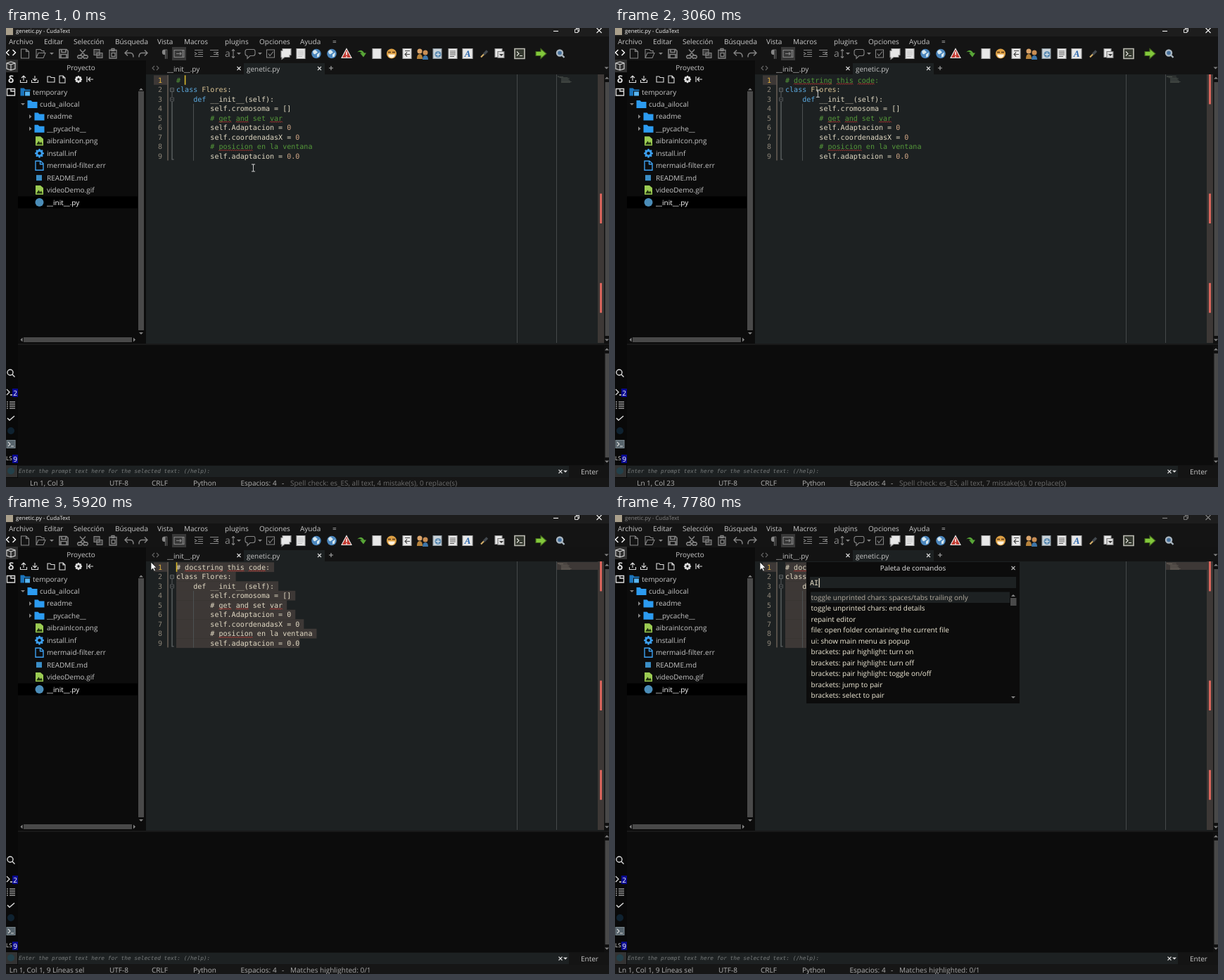
Write an HTML page with a canvas that moves like this. It is 857 by 653 pixels and loops after 8000 ms.

```html
<!DOCTYPE html>
<html lang="es">
<head>
<meta charset="utf-8">
<style>
html, body { margin: 0; width: 100%; height: 100%; overflow: hidden; background: #0b0b0b; }
canvas { display: block; }
</style>
</head>
<body>
<canvas id="stage" width="857" height="653"></canvas>
<script>
const ctx = document.getElementById('stage').getContext('2d');
const LOOP = 8000;
const UI = '"Open Sans", sans-serif', MONO = '"DejaVu Sans Mono", monospace';
const EDITOR = '#1d2122', BROWN = '#3d3836', GREY = '#858585', LIGHT = '#dcdcdc', BLUE = '#3da0f0';
const CELL = 6.045, LINE = 13.5, LEFT = 242, TOP = 67.3;

function rect(x, y, w, h, color) { ctx.fillStyle = color; ctx.fillRect(x, y, w, h); }
function frame(x, y, w, h, color) { ctx.strokeStyle = color; ctx.lineWidth = 1; ctx.strokeRect(x, y, w, h); }
function disc(x, y, r, color) { ctx.fillStyle = color; ctx.beginPath(); ctx.arc(x, y, r, 0, 7); ctx.fill(); }
// Text is placed by the vertical middle of its row.
function text(s, x, y, color = LIGHT, size = 10, align = 'left', family = UI, style = '') {
  ctx.font = `${style} ${size}px ${family}`;
  ctx.textAlign = align;
  ctx.fillStyle = color;
  ctx.fillText(s, x, y + size * 0.35);
}
function icon(x, y, path, stroke, fill, width = 1.1) {
  ctx.save();
  ctx.translate(x, y);
  const p = new Path2D(path);
  if (fill) { ctx.fillStyle = fill; ctx.fill(p); }
  if (stroke) { ctx.strokeStyle = stroke; ctx.lineWidth = width; ctx.stroke(p); }
  ctx.restore();
}
const DOC = 'M-5.5-6.5H1.5L5.5-3V6.5H-5.5Z', SHEET = 'M-6-7H6V7H-6Z', DOWN = 'M-3-1.5H3L0 1.5Z', UP = 'M-3 1.5H3L0-1.5Z';
const CROSS = 'M-2.5-2.5L2.5 2.5M2.5-2.5L-2.5 2.5', FOLDER = 'M-7-5.5H-2L0-3.5H7V5.5H-7Z';
const TERMINAL = 'M-6-5.5H6V5.5H-6Z', PROMPT = 'M-4-3L-1 0L-4 3M0 3H4', GLASS = 'M3-1A4 4 0 1 1-5-1A4 4 0 1 1 3-1M2 2L5.5 5.5';
const PICTURE = 'M-4.5 5L-1 0L1 3L2.5 1L4.5 5Z', LINES = 'M-4-3.5H4M-4-1H4M-4 1.5H4M-4 4H2';

function drawTitle(title, active) {
  rect(0, 0, 857, 12, '#1d1d1d');
  rect(0, 0, 10, 10, '#aaa08c');
  const color = active ? '#f4f4f4' : '#858585';
  text(title, 14, 4.3, color, 7.8);
  icon(781.5, 4.5, 'M-3.5 0H3.5', color);
  icon(811.5, 3.5, 'M-3-1.5H1.5V3H-3ZM-1-1.5V-3H3V1.5H1.5', color, null, 0.9);
  icon(843, 3.5, 'M-3.5-3.5L3.5 3.5M3.5-3.5L-3.5 3.5', color);
}

function drawToolbar() {
  const g = GREY, w = '#e8e8e8', y = 36.5;
  icon(27, y, DOC + 'M1.5-6.5V-3H5', g);
  icon(49, y, 'M-6 6V-6H0L2-4H5V-1M-6 6L-3-1H7L4 6Z', g);
  icon(65, y, DOWN, null, g);
  icon(82, y, 'M-6-6H4L6-4V6H-6ZM-3-6V-2H3V-6M-4 6V1H4V6', g, null, 1.6);
  icon(109, y, 'M-4-6L4 3M4-6L-4 3M-4 3A2 2 0 1 0-4 6A2 2 0 1 0-4 3M4 3A2 2 0 1 0 4 6A2 2 0 1 0 4 3', g, null, 1.5);
  icon(131, y, 'M-6-6H2V2H-6ZM-2-1H6V6H-2Z', g, '#3c3c3c');
  icon(152, y, 'M-5-5H5V6.5H-5ZM-2-7H2V-4H-2ZM-2-1H3V4H-2Z', g, null, 1.3);
  icon(175, y, 'M-2-5L-6-1L-2 3M-6-1H2Q6-1 6 5', g, null, 1.4);
  icon(195, y, 'M2-5L6-1L2 3M6-1H-2Q-6-1-6 5', g, null, 1.4);
  text('¶', 226, y, g, 15, 'center');
  rect(236, 27, 20, 19, '#383838');
  icon(246, y, 'M-7-5H7V5H-7ZM-4 0H3M1-2L3 0L1 2M5-5V5', g);
  for (const [x, tip] of [[274, 'M-6-2L-3 0L-6 2'], [296, 'M6-2L3 0L6 2']])
    icon(x, y, 'M-6-5H6M-1-2H6M-1 1H6M-6 4H6' + tip, g);
  text('a', 311, y, g, 14);
  icon(323, y, 'M0-6V6M-2-4L0-6L2-4M-2 4L0 6L2 4', g);
  icon(331, y, DOWN, null, g);
  icon(347, y, 'M-4-6H5Q7-6 7-3V0Q7 3 4 3H0L-4 7V3Q-7 3-7 0V-3Q-7-6-4-6Z', g);
  icon(361, y, DOWN, null, g);
  icon(376, y, 'M-5.5-5.5H5.5V5.5H-5.5ZM-3 0L-1 3L4-3', g);
  icon(398, y, 'M-5-7H7V2H5V5H-2L-6 8V5H-7V-4H-5Z', '#999', w);
  icon(419, y, SHEET, '#aaa', w);
  icon(419, y, LINES, '#bbb');
  for (const x of [441, 463]) {
    disc(x, y, 6.8, '#4b86bd');
    icon(x, y, 'M-5-3Q-2-7 0-4L2-2L-2 1L-4 0ZM1 1L5-2L4 4L1 5Z', null, '#d8e8ee');
  }
  icon(484, y, 'M0-7L7 6H-7Z', '#eee', '#c23b32');
  icon(484, y, 'M0-3V2M0 3.5V5', '#fff', null, 1.5);
  icon(505, y, 'M-6-2Q0-8 4-1H7L3 5L-2-1H1Q-2-4-6-2Z', null, '#58a637');
  icon(527, y, SHEET, '#aaa', w);
  disc(548, y, 7, '#dda044');
  icon(548, y, 'M-5 1H5Q4 6 0 6Q-4 6-5 1Z', null, '#fff4df');
  icon(548, y, 'M-5-2H-1M1-2H5', '#59371a', null, 1.4);
  icon(570, y, SHEET, '#aaa', w);
  icon(570, y, 'M-3-4H4M4 1H-2M0-2L-3 1L0 4', '#444');
  disc(588, 33, 3.5, '#d9a36a'); icon(588, 40, 'M-4 4Q-4-3 0-3Q4-3 4 4Z', null, '#b8843c');
  disc(596, 35, 3.5, '#c98e54'); icon(596, 42, 'M-4 3Q-4-3 0-3Q4-3 4 3Z', null, '#3f76a8');
  icon(613, y, SHEET, '#8b979e', '#ccd3d8');
  disc(614, y + 1, 4.5, '#5f8db3');
  icon(614, y + 1, 'M-3 0H3M0-3V3', '#e2e8eb');
  icon(635, y, SHEET, '#aaa', w);
  icon(635, y, LINES, '#555');
  icon(656, y, 'M-7-7H7V7H-7Z', '#aaa', w);
  text('A', 656, y, '#2864ab', 13, 'center', '"Liberation Serif", serif', 'italic bold');
  icon(680, y, 'M-5 5L0 0', '#d5b06a', null, 2.2);
  icon(680, y, 'M-1 1L4-4', '#444a50', null, 3.5);
  icon(701, y, 'M-6-7H4V5H-6Z', '#999', w);
  icon(703, y, 'M-4-3H5V6H-4Z', '#777', '#ddd');
  icon(704, y + 2, DOWN, null, '#333');
  icon(730, y, 'M-7-7H7V7H-7Z', '#bdbdb4', '#34382f', 1.6);
  icon(730, y, PROMPT, '#e4e4dc');
  icon(760, y, 'M-7-3H0V-7L8 0L0 7V3H-7Z', '#446a1c', '#83c83c');
  icon(788, y, GLASS, '#a9b6c0', '#456f9b', 2.4);
}

function drawActivityBar() {
  const w = LIGHT;
  rect(0, 46, 17, 594, '#090909');
  rect(0, 45, 17, 18, '#303030');
  icon(7, 35, 'M-2.5-4L-6.5 0L-2.5 4M2.5-4L6.5 0L2.5 4', '#fff', null, 1.4);
  icon(7, 54, 'M-6-4L0-6L6-4V4L0 6L-6 4ZM-6-4L0-2L6-4M0-2V6', w);
  text('δ', 7, 73, w, 14, 'center', UI, 'bold');
  icon(7, 91, 'M-5.5-4.5H5.5V5H-5.5ZM0-4V-1H5', w, null, 1.4);
  icon(7, 491, GLASS, w, null, 1.4);
  icon(5, 518, 'M-4-4L0 0L-4 4M1 4H5', w, null, 1.3);
  icon(7, 536, 'M-6-4H-4M-2-4H6M-6-1H-4M-2-1H6M-6 2H-4M-2 2H6M-6 5H-4M-2 5H6', w);
  icon(7, 555, 'M-5 0L-2 3L5-3', w, null, 1.5);
  disc(7, 573, 5, '#0f2230');
  icon(7, 592, TERMINAL, '#78858c', '#56636b');
  icon(7, 592, PROMPT, w);
  text('LSP', 0, 612, w, 8);
  for (const [n, y] of [['2', 519], ['9', 613]]) {
    rect(9, y - 6, 8, 12, '#0a0a90');
    text(n, 13, y, '#fff', 10, 'center');
  }
  rect(0, 622, 16, 17, '#333');
  disc(7, 630, 5, '#23404a');
}

function drawSidebar() {
  rect(17, 46, 182, 403, '#0c0c0c');
  text('Proyecto', 106.5, 56.5, '#c8c8c8', 10, 'center');
  const arrowBase = 'M-4.5 1V4.5H4.5V1M0 2V-5';
  icon(25, 73, arrowBase + 'M-3-2L0-5L3-2', LIGHT);
  icon(41, 73, arrowBase + 'M-3-1L0 2L3-1', LIGHT);
  icon(64, 73, 'M-5-4H-1L0-2.5H5V4H-5Z', LIGHT);
  icon(80, 73, 'M-4-5H1L4-2V5H-4ZM1-5V-2H4', LIGHT);
  gear(103, 73, 3.7, LIGHT, '#0c0c0c');
  icon(119, 73, 'M-4-4V4M5 0H-2M1-3L-2 0L1 3', LIGHT);
  rect(17, 239.5, 170, 17, '#000');

  const rows = [['temporary', 38], ['cuda_ailocal', 48], ['readme', 58], ['__pycache__', 58], ['aibrainIcon.png', 58],
    ['install.inf', 58], ['mermaid-filter.err', 58], ['README.md', 58], ['videoDemo.gif', 58], ['__init__.py', 58]];
  rows.forEach(([name, x], i) => {
    const y = 91 + i * 17.45, ix = x - 10.5;
    text(name, x, y, i === 9 ? '#fff' : '#c6c6c6');
    if (i < 4) icon(ix, y, FOLDER, null, i ? '#2c9bf0' : '#1b75bd');
    if (i === 0) icon(ix + 2, y + 2, 'M-3-3H5V4H-3Z', '#0c0c0c', '#58b5f2');
    if (i === 1) icon(24, y, DOWN, null, GREY);
    if (i === 2 || i === 3) icon(34.5, y, 'M-1.5-3V3L2 0Z', null, GREY);
    if (i === 4 || i === 8) {
      icon(ix, y, DOC, null, '#9bcb52');
      icon(ix, y, PICTURE, null, '#22330f');
    }
    if (i === 5) gear(ix, y, 5, BLUE, '#0c0c0c');
    if (i === 6) icon(ix, y, DOC + 'M1-6V-2H5', BLUE, null, 1.4);
    if (i === 7) rect(43, y - 4, 8, 8, '#3b8fc8');
    if (i === 9) disc(ix, y, 6, '#4b8db8');
  });
  rect(188, 90, 8, 340, '#494949');
  icon(192, 87, UP, null, GREY);
  icon(192, 434.5, DOWN, null, GREY);
  rect(25, 440, 154, 7, '#494949');
  icon(22, 443.5, 'M1.5-3V3L-1.5 0Z', null, GREY);
  icon(182.5, 443.5, 'M-1.5-3V3L1.5 0Z', null, GREY);
}

function gear(x, y, r, color, hole) {
  for (let i = 0; i < 8; i++) {
    const a = i * Math.PI / 4;
    disc(x + Math.cos(a) * r, y + Math.sin(a) * r, 1.5, color);
  }
  disc(x, y, r, color);
  disc(x, y, r * 0.45, hole);
}

function drawTabs(modified) {
  rect(199, 46, 658, 20, '#131313');
  rect(338, 50, 115, 16, EDITOR);
  icon(209.5, 57, 'M1.5-3L-1.5 0L1.5 3', '#666');
  icon(215.5, 57, 'M-1.5-3L1.5 0L-1.5 3', '#666');
  text('__init__.py', 229, 58, '#c6c6c6');
  text('genetic.py', 342, 58, '#c6c6c6');
  icon(331, 57.5, CROSS, LIGHT);
  icon(445.5, 57.5, CROSS, LIGHT);
  icon(462, 57, 'M-3 0H3M0-3V3', '#aaa');
  icon(853.5, 57, DOWN, null, GREY);
  if (modified) disc(395.5, 51, 2, '#bbb');
}

const BODY = ['class Flores:', '    def __init__(self):', '        self.cromosoma = []', '        # get and set var',
  '        self.Adaptacion = 0', '        self.coordenadasX = 0', '        # posicion en la ventana', '        self.adaptacion = 0.0'];
const TOKEN = /#.*|\b(?:class|def)\b|\b\d[\d.]*|Flores|[^#\d]?/g;
const END = { row: 8, col: 29 };

function tokenColor(token) {
  if (token[0] === '#') return '#55993a';
  if (/^(class|def)$/.test(token)) return '#5ca9df';
  if (/^\d/.test(token)) return '#d2a887';
  return token === 'Flores' ? '#dbc394' : '#e2dac4';
}
const cellX = col => LEFT + col * CELL;
const rowY = row => TOP + row * LINE;

function wave(lines, row, word) {
  const start = lines[row].indexOf(word), end = cellX(start + word.length), y = rowY(row) + 12.2;
  ctx.beginPath();
  for (let x = cellX(start), i = 0; x <= end; x += 1.5, i++) ctx.lineTo(x, y + (i % 2 ? -0.8 : 0.8));
  ctx.strokeStyle = '#c23a35';
  ctx.lineWidth = 0.8;
  ctx.stroke();
}

function drawEditor(s) {
  const lines = [s.pasted ? '# docstring this code:' : '# ', ...BODY];
  rect(199, 66, 658, 383, EDITOR);
  rect(210, rowY(s.caret.row), 20, LINE, BROWN);
  rect(229, 67, 2, 121.5, '#554f49');
  const foldColor = s.caret.row > 1 ? '#41479c' : '#55595a';
  icon(236, 0, 'M0 91V187H2.5', '#55595a');
  icon(236, 0, 'M0 104V187H2.5', foldColor);
  [88, 101.5].forEach((y, i) => {
    rect(233, y - 3, 6, 6, EDITOR);
    icon(236, y, 'M-2.5-2.5H2.5V2.5H-2.5ZM-1.5 0H1.5', i ? foldColor : '#666a6b', null, 0.9);
  });
  rect(726, 66, 1, 382, '#45494a');
  rect(782, 66, 1, 382, '#45494a');
  if (s.selecting) rect(783, 67 + s.caret.row * 1.1, 58, 11 - s.caret.row * 1.1, BROWN);

  lines.forEach((line, row) => {
    const y = rowY(row);
    text(row + 1, 222, y + 6.9, row === s.caret.row ? '#e0b040' : '#8d8578', 10, 'right', MONO);
    let from = Infinity;
    if (s.selecting && row >= s.caret.row) {
      from = row === s.caret.row ? s.caret.col : 0;
      const to = row === END.row ? END.col : line.length + 1;
      rect(cellX(from), y, (to - from) * CELL, LINE + 0.3, BROWN);
    }
    let col = 0;
    for (const token of line.match(TOKEN))
      for (const ch of token) {
        if (ch !== ' ') text(ch, cellX(col), y + 6.9, col >= from ? '#e2dac4' : tokenColor(token), 10.05, 'left', MONO);
        col++;
      }
    const indent = line.search(/\S/);
    rect(784 + indent * 0.62, 68.3 + row * 1.1, (line.length - indent) * 0.62, 0.6, s.selecting ? '#8a827599' : '#79807699');
  });
  rect(266, rowY(3), 1, LINE * 6, '#4d5152');
  for (const word of ['get', 'and', 'var']) wave(lines, 4, word);
  wave(lines, 7, 'posicion');
  if (s.checked) for (const word of ['docstring', 'this', 'code']) wave(lines, 0, word);

  rect(841, 66, 9, 382, BROWN);
  const mark = (row, color) => rect(844, 66 + row * 42.4, 3, 42.4, color);
  for (const row of s.checked ? [0, 4, 7] : [4, 7]) mark(row, '#d9655c');
  if (s.matches) {
    for (const row of [5, 6, 8]) mark(row, '#4b45b0');
    for (const [row, col] of [[5, 26], [6, 28], [8, 26], [8, 28]])
      frame(cellX(col), rowY(row) + 0.7, CELL, LINE - 1.5, '#3488a8');
  }
  if (s.caretOn) rect(cellX(s.caret.col) - 0.3, rowY(s.caret.row), 1.6, LINE, '#d9b92c');
}

function drawFooter(s) {
  rect(17, 449, 840, 174, '#0c0c0c');
  rect(17, 449, 840, 2, '#191919');
  for (const [top, bottom] of [[71, 444], [457, 617]]) {
    rect(850, top - 5, 7, bottom - top + 10, '#101010');
    rect(851.5, top + 6, 5.5, bottom - top - 12, '#494949');
    icon(854, top, UP, null, GREY);
    icon(854, bottom, DOWN, null, GREY);
  }
  rect(17, 622, 840, 18, '#141414');
  rect(17, 623, 783, 16, EDITOR);
  text('Enter the prompt text here for the selected text: (/help):', 18, 630.5, '#777b7b', 7.8, 'left', MONO, 'italic');
  icon(788, 631, CROSS, LIGHT);
  icon(795, 631, DOWN, null, LIGHT);
  text('Enter', 817, 631, '#c8c8c8');
  rect(0, 640, 857, 13, '#161616');
  text(s.position, 58, 647.5, '#b4b4b4', 10, 'center');
  for (const [label, x] of [['UTF-8', 147], ['CRLF', 207], ['Python', 266], ['Espacios: 4', 333.5], ['-', 392]])
    text(label, x, 647.5, '#b4b4b4');
  text(s.message, 404, 647.5, s.message[0] === 'S' ? '#6c6c6c' : '#a8a8a8');
}

const ALL_COMMANDS = ['Addons Manager: Install from Git...', "Addons Manager: Visit plugin's homepage...", "Addons Manager: Open plugin's readme...",
  "Addons Manager: Open plugin's history...", 'AI Local: Over Selected Text', 'AI Local: Open console', 'AI Local: Config',
  'ASCII Art: Insert text...', 'ASCII Art: Choose font...', 'ASCII Art: Config'].map(name => 'plugin: ' + name);
const FILTERED_A = ['toggle word wrap', 'toggle word wrap, alternative', 'toggle read-only state', 'toggle unprinted chars: show',
  'toggle unprinted chars: spaces', 'toggle unprinted chars: spaces/tabs trailing only', 'toggle unprinted chars: ends',
  'toggle unprinted chars: end details', 'toggle line numbers bar', 'toggle minimap'];
const FILTERED_AI = ['toggle unprinted chars: spaces/tabs trailing only', 'toggle unprinted chars: end details', 'repaint editor',
  'file: open folder containing the current file', 'ui: show main menu as popup', 'brackets: pair highlight: turn on',
  'brackets: pair highlight: turn off', 'brackets: pair highlight: toggle on/off', 'brackets: jump to pair', 'brackets: select to pair'];

function drawPalette(t) {
  const query = t < 7250 ? '' : t < 7780 ? 'A' : 'AI';
  const items = [ALL_COMMANDS, FILTERED_A, FILTERED_AI][query.length];
  const current = query ? 0 : 4;
  rect(272, 67, 303, 201, '#0c0c0c');
  text('Paleta de comandos', 423.5, 75.5, '#e6e6e6', 9.9, 'center');
  icon(566, 75.5, CROSS, '#bbb');
  rect(277, 88, 293, 16, EDITOR);
  if (query) text(query, 277, 96.5, '#e2dac4', 10.05, 'left', MONO);
  else text('F9: para establecer tecla rápida, @ buscar tecla', 277, 96.5, '#777b7b', 10.05, 'left', MONO, 'italic');
  if (query || t < 6650) rect(277.5 + query.length * CELL, 90, 1.3, 13, '#e2dac4');
  rect(278, 109.5 + current * 15.5, 283, 15.5, EDITOR);
  items.forEach((item, i) => text(item, 278.5, 117 + i * 15.5, i === current ? '#b5ada0' : '#f2ecd8'));
  icon(566, 114.5, UP, null, GREY);
  icon(566, 259.5, DOWN, null, GREY);
  rect(562, query ? 118 : 182, 8.5, 11, '#494949');
}

const PATH = [[0, 351, 199], [460, 351, 199], [850, 260, 71.5], [1050, 260, 71.5], [1190, 259.5, 73], [1390, 259.5, 73],
  [1460, 261.5, 74], [2460, 261.5, 74], [3270, 297, 100], [3830, 431, 183], [4030, 431, 183], [4380, 254, 101], [4800, 206, 67], [8000, 206, 67]];

function mouseAt(t) {
  const i = Math.max(1, PATH.findIndex(key => key[0] > t));
  const [t0, x0, y0] = PATH[i - 1], [t1, x1, y1] = PATH[i];
  const u = (t - t0) / (t1 - t0);
  return { x: x0 + (x1 - x0) * u, y: y0 + (y1 - y0) * u };
}

function drawMouse(t) {
  const { x, y } = mouseAt(t);
  if (t >= 4030 && t < 5060) disc(x, y, 8.3, '#aaa012');
  if (x < 232) icon(x, y, 'M0 0V11.5L2.7 9L4.6 13L6.5 12L4.6 8.2H8Z', '#111', '#fff', 0.7);
  else icon(x + 0.5, y, 'M-2.5-5H2.5M0-5V5M-2.5 5H2.5', '#dedede', null, 0.9);
}

const BLINKS = [500, 1120, 1720, 2180, 2780, 3380, 4030, 4100, 5260, 5920, 6580, 7180, 7710];

function stateAt(t) {
  const s = {
    pasted: t >= 2180, modified: t >= 2180 && t < 2510, checked: t >= 2580,
    matches: t >= 4030 && t < 4100, selecting: t >= 4100,
    caretOn: BLINKS.filter(b => b <= t).length % 2 === 0,
    caret: { row: 0, col: t < 2180 ? 2 : 22 }
  };
  if (t >= 4030) s.caret = { ...END };
  if (s.selecting) {
    // The selection trails slightly behind the pointer.
    const m = mouseAt(t - 20), lengths = [22, ...BODY.map(line => line.length)];
    s.caret.row = Math.max(0, Math.min(8, Math.floor((m.y - TOP) / LINE)));
    s.caret.col = Math.max(0, Math.min(lengths[s.caret.row], Math.round((m.x - LEFT) / CELL)));
  }
  s.position = t < 2250 ? 'Ln 1, Col 3' : t < 4100 ? 'Ln 1, Col 23' : t < 4800 ? 'Ln 9, Col 30' : 'Ln 1, Col 1, 9 Líneas sel';
  s.message = s.selecting ? 'Matches highlighted: 0/1' : s.matches ? 'Matches highlighted: 4/4'
    : `Spell check: es_ES, all text, ${s.checked ? 7 : 4} mistake(s), 0 replace(s)`;
  return s;
}

const MENU = [['Archivo', 4], ['Editar', 54], ['Selección', 96], ['Búsqueda', 155], ['Vista', 215], ['Macros', 253],
  ['plugins', 311], ['Opciones', 360], ['Ayuda', 418], ['=', 464]];

function draw(now) {
  const t = now % LOOP, s = stateAt(t), palette = t >= 6050;
  ctx.textRendering = 'geometricPrecision';
  rect(0, 0, 857, 653, '#141414');
  drawTitle(`${s.modified ? '*' : ''}genetic.py - CudaText`, !palette);
  for (const [label, x] of MENU) text(label, x, 19.5, '#c8c8c8');
  drawToolbar();
  drawSidebar();
  drawActivityBar();
  drawTabs(s.modified);
  drawEditor(s);
  drawFooter(s);
  if (palette) drawPalette(t);
  drawMouse(t);
  requestAnimationFrame(tick);
}

const start = performance.now();
function tick() { draw(performance.now() - start); }
tick();
</script>
</body>
</html>
```
